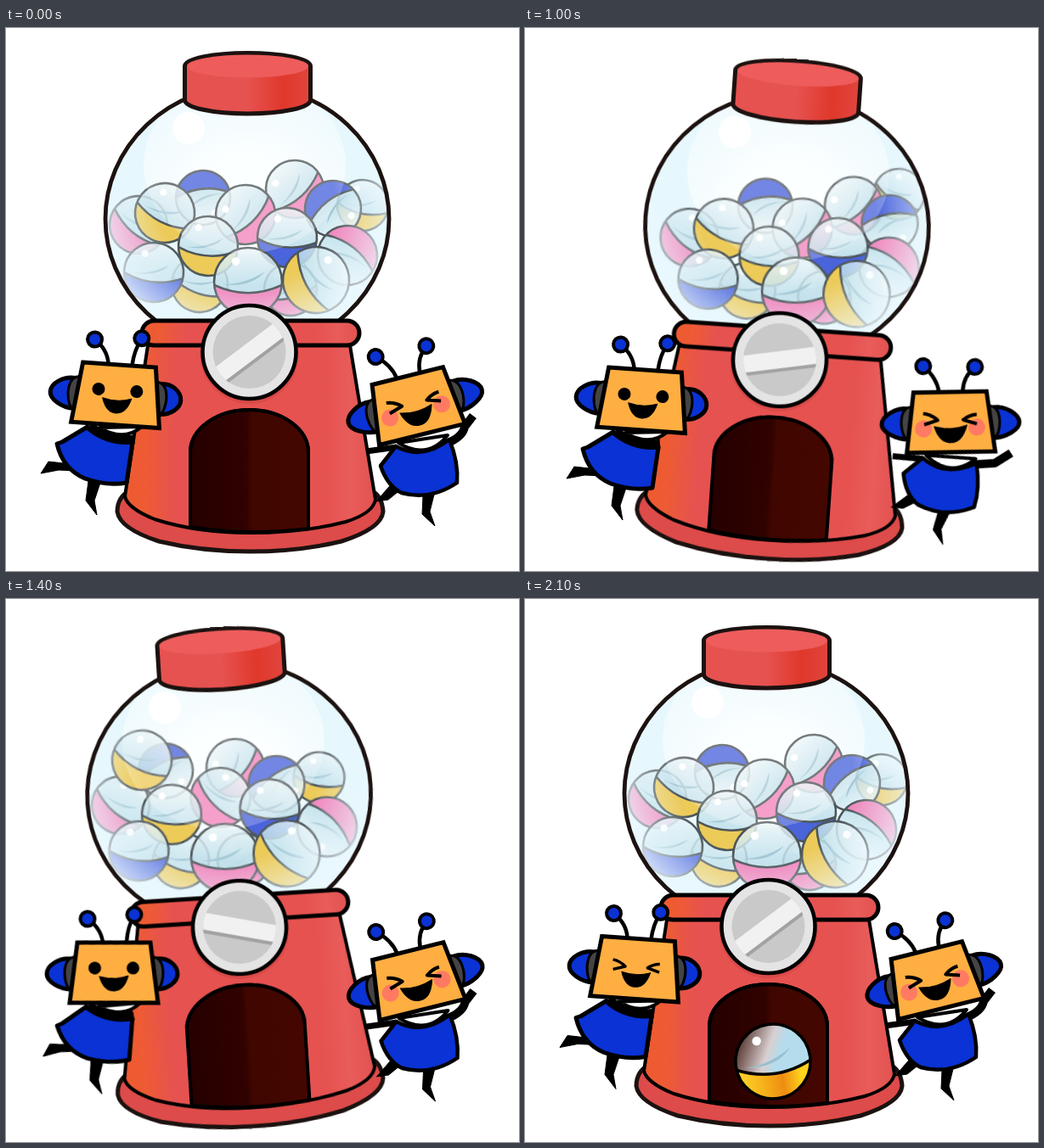
An HTML page that plays this animation: 604x640 px, repeating every 3.1 s.

```html
<!DOCTYPE html>
<html lang="en">
<head>
<meta charset="utf-8">
<title>Capsule machine</title>
<style>
html, body { margin: 0; width: 100%; height: 100%; overflow: hidden; background: #fff; }
svg { display: block; width: 100%; height: 100%; }
</style>
</head>
<body>
<svg id="stage" viewBox="0 0 604 640">
<defs>
  <linearGradient id="cap"><stop offset=".5" stop-color="#e65250"/><stop offset=".78" stop-color="#e0382b"/><stop offset="1" stop-color="#e0453e"/></linearGradient>
  <linearGradient id="body"><stop offset="0" stop-color="#ee5a30"/><stop offset=".08" stop-color="#ee5b34"/><stop offset=".2" stop-color="#e65250"/><stop offset=".8" stop-color="#e65250"/><stop offset=".9" stop-color="#e85c5a"/><stop offset="1" stop-color="#e25250"/></linearGradient>
  <linearGradient id="door"><stop offset="0" stop-color="#260000"/><stop offset=".48" stop-color="#300200"/><stop offset=".52" stop-color="#400600"/><stop offset="1" stop-color="#440700"/></linearGradient>
  <radialGradient id="glass" cx=".5" cy=".45" r=".6"><stop offset=".3" stop-color="#f8feff"/><stop offset="1" stop-color="#cdeff9"/></radialGradient>
  <radialGradient id="haze" cx=".5" cy=".44" r=".56"><stop offset=".55" stop-color="#f4fcff" stop-opacity="0"/><stop offset="1" stop-color="#effaff" stop-opacity=".9"/></radialGradient>
  <linearGradient id="shell" x2="0" y2="1"><stop offset="0" stop-color="#e8f3f6" stop-opacity=".85"/><stop offset=".6" stop-color="#b4d9e6" stop-opacity=".85"/></linearGradient>
  <linearGradient id="prizeShell" x2="1" y2=".5"><stop offset=".1" stop-color="#4a2620"/><stop offset=".5" stop-color="#d9cfd0"/><stop offset=".65" stop-color="#b4dcec"/></linearGradient>
  <linearGradient id="prizeBowl"><stop offset="0" stop-color="#ffd52a"/><stop offset=".3" stop-color="#f6b51c"/><stop offset=".6" stop-color="#ee8d10"/><stop offset=".85" stop-color="#ffd21c"/></linearGradient>
  <clipPath id="globeClip"><ellipse cx="284" cy="225" rx="167" ry="157"/></clipPath>
  <clipPath id="doorClip"><path d="M217 588V500A69.500 50 0 0 1 356 500V590Q287 599 217 588Z"/></clipPath>
  <clipPath id="dialClip"><circle r="43"/></clipPath>
</defs>
</svg>
<script>
const BLUE = '#0a32d4', YELLOW = '#edc23a', PINK = '#f06fb0', INDIGO = '#2c48d6';
const PIVOT = [286.5, 382];
const LOOP = 3100;

// Capsules, back to front: colour, radius, turn of the coloured half
const capsules = [
  [INDIGO, 32, 174], [PINK, 34, 40], [YELLOW, 30, 12], [PINK, 34, -42], [INDIGO, 33, 142],
  [PINK, 35, -44], [YELLOW, 35, 27], [PINK, 35, 218], [YELLOW, 33, 20], [PINK, 31, -15],
  [INDIGO, 35, 4], [YELLOW, 35, 4], [INDIGO, 35, 6], [PINK, 40, 0], [YELLOW, 39, 62]
];
const piles = {
  rest: [[232,200],[156,232],[420,209],[340,190],[385,213],[282,220],[187,218],[402,268],
         [228,302],[335,308],[331,247],[238,257],[174,288],[285,299],[365,297]],
  lean: [[270,178],[197,235],[434,194],[373,184],[423,225],[313,207],[233,219],[422,264],
         [245,294],[350,306],[351,247],[283,259],[206,295],[326,300],[387,301]],
  right: [[334,210],[231,253],[460,174],[434,220],[474,238],[371,243],[281,246],[455,287],
          [295,308],[370,318],[406,262],[337,272],[257,295],[353,313],[416,321]],
  left: [[144,200],[114,249],[317,207],[200,203],[252,218],[223,243],[133,157],[354,264],
         [184,309],[225,302],[290,243],[152,246],[139,301],[231,306],[296,298]]
};
// Extra turn of single capsules in a pile
const turns = {
  rest: {}, lean: { 2: 48, 4: 10 }, right: { 2: 40, 4: 55, 14: 8 }, left: { 0: -38, 3: -12, 5: 180, 7: 15, 14: -37 }
};

const mix = (a, b) => (a + b) / 2;
const pile = (name, other = name) => dy => capsules.map(([color, r, turn], i) => {
  const at = n => piles[n][i].concat(turn + (turns[n][i] || 0));
  const a = at(name), b = at(other);
  const lift = (name === 'rest' ? dy / 2 : 0) + (other === 'rest' ? dy / 2 : 0);
  return capsule(mix(a[0], b[0]), mix(a[1], b[1]) + lift, r, mix(a[2], b[2]), color);
}).join('');

const path = (d, fill = 'none', stroke = '#000', width = 5) =>
  `<path d="${d}" fill="${fill}" stroke="${stroke}" stroke-width="${width}" stroke-linejoin="round"/>`;
const disc = (x, y, r, fill, extra = '') => `<circle cx="${x}" cy="${y}" r="${r}" fill="${fill}" ${extra}/>`;
const oval = (x, y, rx, ry, fill, extra = '') =>
  `<ellipse cx="${x}" cy="${y}" rx="${rx}" ry="${ry}" fill="${fill}" ${extra}/>`;
const group = (transform, content) => `<g transform="${transform}">${content}</g>`;
const outline = width => `stroke="#000" stroke-width="${width}"`;

function capsule(x, y, r, turn, color, shell = 'url(#shell)', line = '#30383c', width = 2.6) {
  const k = n => (n * r).toFixed(1);
  const seam = `M${k(-.995)} ${k(.1)}Q0 ${k(.56)} ${k(.995)} ${k(.1)}`;
  return group(`translate(${x} ${y}) rotate(${turn})`,
    disc(0, 0, r, shell) +
    path(`M${k(-.75)} ${k(.08)}Q${k(-.1)} ${k(.08)} ${k(.5)} ${k(-.3)}Q${k(.1)} ${k(.18)} ${k(-.75)} ${k(.08)}Z`, '#98c0d0', 'none', 0) +
    path(`${seam}A${r} ${r} 0 0 1 ${k(-.995)} ${k(.1)}Z`, color, 'none', 0) +
    path(seam, 'none', line, width) +
    disc(0, 0, r, 'none', `stroke="${line}" stroke-width="${width}"`) +
    disc(-r * .36, -r * .6, r * .12, '#fff'));
}

function dial(angle) {
  return disc(0, 3, 58, '#b93a38', 'opacity=".3"') +
    disc(0, 0, 55, '#e4e4e4', outline(4.5)) + disc(0, 0, 43, '#c9c9c9') +
    `<g clip-path="url(#dialClip)">` + group(`rotate(${angle})`,
      '<rect x="-50" y="9" width="100" height="5" fill="#a2a2a2"/>' +
      '<rect x="-50" y="-10" width="100" height="20" fill="#f1f1f1"/>') + '</g>';
}

function machine({ at: [x, y, tilt], bar, balls, prize }) {
  const [px, py] = PIVOT;
  const undo = `translate(${px} ${py}) rotate(${-tilt}) translate(${-x} ${-y})`;
  const dark = '#1c1210';
  return group(`translate(${x} ${y}) rotate(${tilt}) translate(${-px} ${-py})`,
    oval(284, 225, 167, 157, 'url(#glass)') +
    oval(281, 162, 119, 104, '#fff', 'opacity=".4"') +
    `<g clip-path="url(#globeClip)"><g opacity=".85">${group(undo, balls(y - py))}</g></g>` +
    oval(281, 162, 119, 104, '#fff', 'opacity=".22"') +
    oval(284, 225, 167, 157, 'url(#haze)', `stroke="${dark}" stroke-width="4.8"`) +
    disc(215, 118, 19, '#fff') +
    path('M210.500 45A74 15.500 0 0 1 358.500 45V85A74 16 0 0 1 210.500 85Z', 'url(#cap)', dark) +
    oval(284.5, 45, 71.5, 13.5, '#ee5c5c') +
    path('M146 545Q131 553 131 570Q134 590 180 605Q230 617 287 617Q345 617 395 605Q442 590 444 570Q443 553 432 546Z', '#dd4b4a', dark) +
    path('M167 374L140 552Q143 566 175 579Q225 595 287 595Q350 595 400 582Q432 572 435 556L405 374Z', 'url(#body)', '#000', 4) +
    path('M217 588V500A69.500 50 0 0 1 356 500V590Q287 599 217 588Z', 'url(#door)', '#000', 4) +
    (prize ? `<g clip-path="url(#doorClip)">${capsule(292, prize[0], 44, prize[1], 'url(#prizeBowl)', 'url(#prizeShell)', '#000', 3.5)}</g>` : '') +
    path('M217 588V500A69.500 50 0 0 1 356 500V590', 'none', '#000', 4) +
    `<rect x="160" y="345" width="256" height="29" rx="14.500" fill="url(#body)" ${outline(5)}/>` +
    group(`translate(${px} ${py})`, dial(bar - tilt)));
}

const eyes = disc(-22.5, -6, 7.5, '#000') + disc(22.5, -6, 7.5, '#000');
const smile = path('M-17 4Q0 9 17 3Q12 21 0 21Q-12 21 -17 4Z', '#000', '#000', 1);
const faces = {
  happy: eyes + smile,
  laugh: path('M-32 -11Q-23 -10 -15 -3L-31 2M31 -9Q23 -9 15 -3L31 2', 'none', '#000', 4) + group('scale(1.13)', smile),
  shock: eyes + oval(-1, 13, 8, 12, '#000')
};

function ear(tip) {
  return path(`M-50 -17C-64 -19 ${-tip} -9 ${-tip} 1C${-tip} 10 -64 19 -50 19Z`, BLUE) +
    path('M-46 -19Q-58 -18 -58 1Q-57 17 -50 20L-44 20Z', '#444', '#000', 3);
}

function head(face, antennas, ears, cheeks, scale) {
  const [l, r] = antennas;
  return ear(ears[0]) + group('scale(-1 1)', ear(ears[1])) +
    path(`M-13 -36Q-15 -53 ${l[0]} ${l[1]}M15 -37Q16 -54 ${r[0]} ${r[1]}`, 'none', '#000', 4.5) +
    antennas.map(([x, y]) => disc(x, y, 8.5, BLUE, outline(4))).join('') +
    `<path d="M-43 -36L43 -36L52 35L-52 35Z" fill="#ffae42" ${outline(5)}/>` +
    (cheeks ? disc(-32, 7, 10, '#ff7a62') + disc(31, 6, 10, '#ff7a62') : '') +
    group(`scale(${scale})`, faces[face]);
}

function leftRobot([x, y, turn, face]) {
  const body =
    path('M78 508L68 513L50 511L41 525L62 521L86 522Z', '#000', '#000', 1) +
    path('M97 534L111 536L104 557L107 574L94 557Z', '#000', '#000', 1) +
    path('M66 488L60 490Q67 520 93 531Q118 540 142 536L149 488Q116 488 96 470Z', BLUE) +
    path('M110 471Q138 488 160 470Z', '#fff', '#000', 4) +
    path('M98 469Q120 488 151 485', 'none', '#000', 11);
  return group(`translate(${x} ${y}) rotate(${turn - 4})`,
    group('translate(-131 -433)', body) +
    group('rotate(4)', head(face, [[-31, -64], [24, -69]], [79, 75], false, face === 'laugh' ? .88 : 1)));
}

const arms = {
  up: 'M518 490Q538 482 540 470L550 457',
  out: 'M516 488L543 480L559 464',
  in: 'M514 489L528 483'
};

function rightRobot([x, y, turn, face, arm]) {
  const body =
    path('M455 536L466 543L450 556L436 558Z', '#000', '#000', 1) +
    path('M491 551L504 550L499 570L505 587L490 573Z', '#000', '#000', 1) +
    path('M460 494L424 499', 'none', '#000', 7) +
    path(arms[arm], 'none', '#000', 10) +
    path('M459 493L441 516Q449 540 466 548Q500 557 531 536Q533 512 522 485Q490 510 459 493Z', BLUE, '#000', 4.5) +
    path('M462 489Q496 510 520 480Z', '#fff', '#000', 4);
  return group(`translate(${x} ${y}) rotate(${turn + 14})`,
    group('translate(-481.500 -445)', body) +
    group('rotate(-14)', head(face, [[-31, -67], [30, -65]], [81, 81], true, 1)));
}

const steps = [
  { start: 0, at: [286.5, 382, 0], bar: -37, balls: pile('rest'),
    left: [131, 433, 4, 'happy'], right: [481.5, 445, -14, 'laugh', 'up'] },
  { start: 500, at: [296, 378, 4], bar: -7, balls: pile('lean'),
    left: [137, 427, 4, 'happy'], right: [496, 454.5, -1, 'laugh', 'out'] },
  { start: 700, at: [316, 388, 10.5], bar: 42, balls: pile('right'),
    left: [143, 437, 8, 'shock'], right: [500.5, 464, -1, 'shock', 'in'] },
  { start: 1000, at: [300, 391, 4], bar: -7, balls: pile('right', 'rest'),
    left: [139, 439, 4, 'happy'], right: [501, 465, -1, 'laugh', 'out'] },
  { start: 1200, at: [287, 392, 0], bar: -37, balls: pile('rest'),
    left: [131.5, 442, 4, 'happy'], right: [482, 454, -14, 'laugh', 'up'] },
  { start: 1400, at: [275, 387, -3.6], bar: 10, balls: pile('rest', 'left'),
    left: [127, 441, 0, 'happy'], right: [482, 450, -14, 'laugh', 'up'] },
  { start: 1600, at: [263, 381, -7.3], bar: 57, balls: pile('left'), prize: [440, -16],
    left: [122.5, 440, -5, 'shock'], right: [482, 446, -14, 'shock', 'out'] },
  { start: 1900, at: [275, 385, -3.6], bar: 10, balls: pile('left', 'rest'), prize: [490, -12],
    left: [127, 438, 0, 'happy'], right: [482, 447, -14, 'laugh', 'up'] },
  { start: 2100, at: [286.5, 386, 0], bar: -37, balls: pile('rest'), prize: [541, -8],
    left: [131, 436.5, 4, 'laugh'], right: [481.5, 449, -14, 'laugh', 'up'] }
];

const stage = document.getElementById('stage');
const scenes = steps.map(step => {
  const scene = document.createElementNS('http://www.w3.org/2000/svg', 'g');
  scene.innerHTML = machine(step) + leftRobot(step.left) + rightRobot(step.right);
  scene.style.display = 'none';
  return stage.appendChild(scene);
});

const begin = performance.now();
let shown = -1;
function draw() {
  const time = (performance.now() - begin) % LOOP;
  const now = steps.filter(step => step.start <= time).length - 1;
  if (now !== shown) {
    scenes.forEach((scene, i) => { scene.style.display = i === now ? '' : 'none'; });
    shown = now;
  }
  requestAnimationFrame(draw);
}
draw();
</script>
</body>
</html>
```
